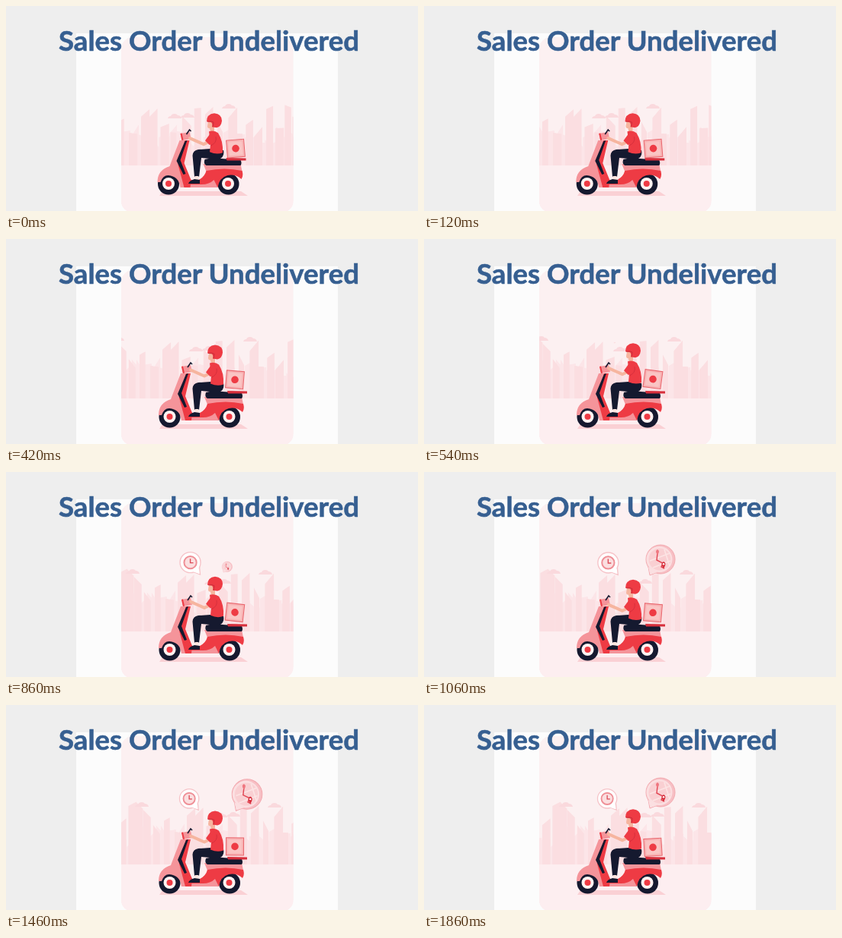
Animation of 540 by 270 pixels, one loop 2.06 s. Source, as an HTML page:

```html
<!DOCTYPE html>
<html lang="en">
<head>
<meta charset="utf-8">
<title>Sales Order Undelivered</title>
<style>
  html, body { margin: 0; width: 100%; height: 100%; overflow: hidden; background: #eee; }
  svg { display: block; width: 540px; height: 270px; }
  .title {
    font: 700 36.6px Lato, Carlito, sans-serif; text-anchor: middle;
    fill: #365f91; stroke: #365f91; stroke-width: .6px;
  }
  .navy { fill: #15192f; }
  .red { fill: #ee3b44; }
  .deep { fill: #d72f3c; }
  .rose { fill: #f5949a; }
  .skin { fill: #f6b59f; }
</style>
</head>
<body>
<svg viewBox="0 0 540 270">
  <defs>
    <clipPath id="card"><rect x="151" y="41" width="225.5" height="231" rx="15"/></clipPath>
    <path id="cloud" d="M-9 3Q-8 0-5 0Q-4-3 0-3Q3-3 4-1Q8-1 9 3Z" fill="#fad9dd"/>
    <g id="hub">
      <circle r="8" fill="#fff3f2"/>
      <circle r="4" class="red"/>
    </g>
  </defs>

  <rect x="92" y="36" width="343" height="234" fill="#fcfcfc"/>
  <g clip-path="url(#card)">
    <rect x="151" y="36" width="226" height="234" fill="#fcf0f1"/>
    <g id="city"></g>
    <rect x="151" y="210" width="226" height="60" fill="#fdeef0"/>
  </g>

  <path d="M205 244H308L317 250H201Z" fill="#fad0d4"/>

  <g id="scooter">
    <circle class="navy" cx="214.5" cy="234.5" r="14"/>
    <circle class="navy" cx="293" cy="234.5" r="14"/>
    <!-- rear body: rose band under the seat, red flank, rose sill -->
    <path class="rose" d="M260 208H309L311 218H264Z"/>
    <path class="red" d="M264 217Q288 212 311 217Q313 224 310 228Q302 221 292 223Q281 226 279 239H231L228 226L238 222L244 229H254Q262 225 264 217Z"/>
    <path class="rose" d="M233 235H258Q268 235 274 229L279 239H234Z"/>
    <!-- front fender and leg shield -->
    <path class="rose" d="M200 232Q200 216 216 211L229 177H239L231 209L236 239H230Q228 224 214 223Q207 223 204 232Z"/>
    <path class="red" d="M236 177H242L235 207L244 229L243 239H235L227 209Z"/>
    <path class="navy" d="M236 178L239 177L230 203L237 221L234 222L225 204Z"/>
    <path class="rose" d="M230 168L242 166L244 175L232 177Z"/>
    <path class="red" d="M230 168L232 167.5L234 176.5L232 177Z"/>
    <path d="M238 169L242 163L244 165" fill="none" stroke="#15192f" stroke-width="1.6"/>
    <use href="#hub" x="214.5" y="234"/>
    <use href="#hub" x="292.5" y="234"/>
    <!-- seat and rack -->
    <path class="navy" d="M262 202Q272 199 284 201L309 203Q311 207 309 210H264Q260 208 262 202Z"/>
    <path class="deep" d="M290 200L316 200.5V203.5H291Z"/>
  </g>

  <g id="parcel">
    <rect x="-11.5" y="-11.5" width="23" height="23" fill="#f8b3b4" stroke="#e9656c"/>
    <rect x="-9" y="-9" width="18" height="18" fill="#fac5c4"/>
    <circle r="4.8" class="red"/>
  </g>

  <!-- leg, ankle and shoe -->
  <path class="navy" d="M268 188L285 190Q287 200 278 202L256 200L253 225H247L244.5 197Q245 190 252 189Z"/>
  <path d="M247.5 224H252.5V230H248Z" fill="#fde3dd"/>
  <path class="navy" d="M247 228L254 229V234H239Q240 230 247 228Z"/>

  <g id="rider">
    <path class="skin" d="M266 149H274V163H269L268 158Q265 158 265 155Z"/>
    <path class="red" d="M267 162Q274 160 279 164Q286 175 285 190Q277 193 268 189L269 179Z"/>
    <path d="M270 174L260 179L242 171" fill="none" stroke="#f6b59f" stroke-width="4" stroke-linecap="round" stroke-linejoin="round"/>
    <path class="red" d="M270 163Q276 166 274 174L268 180L262 174Z"/>
    <path d="M276 169Q278 177 269 181" fill="none" stroke="#d72f3c"/>
    <path class="red" d="M264 149Q264 139 274 138Q284 139 284 148Q283 156 277 157L271 156Q272 152 270 150Z"/>
    <path d="M265 149Q271 148 273 150L272 156" fill="none" stroke="#c92c3a"/>
  </g>

  <g id="clock">
    <path d="M3 12L13 16L12 5Z" fill="#fff" stroke="#f6c3c8" stroke-width="1.4"/>
    <circle r="13.6" fill="#fff" stroke="#f6c3c8" stroke-width="1.4"/>
    <path d="M3 12L12 15L11 5Z" fill="#fff"/>
    <circle r="8.2" fill="#fbdfe0" stroke="#ef8f96" stroke-width="2"/>
    <path d="M0-5V.5H4" fill="none" stroke="#dc4b57" stroke-width="1.4"/>
  </g>

  <g id="map">
    <path d="M-16 10L-14 21L-4 17Z" fill="#fbdfe1" stroke="#f3a9af"/>
    <circle r="19" fill="#f7bfc4" stroke="#f3a9af"/>
    <circle cx="-1.5" r="17" fill="#fbdfe1"/>
    <path d="M-16 10L-13.5 20L-4 17Z" fill="#fbdfe1"/>
    <circle cx="-1" r="14.5" fill="#f9cfd2"/>
    <path d="M-14 2L12-8M-10 11L13 2M5-13L12 9" fill="none" stroke="#fce4e4" stroke-width="1.6"/>
    <path d="M-4-8L-5 1L3 5L1 10L5 12" fill="none" stroke="#e14552" stroke-width="1.4"/>
    <path d="M-4-6Q-8-11-4-13Q0-11-4-6Z" fill="#ef7780"/>
    <path d="M4 12Q-1 5 4 3Q9 5 4 12Z" class="deep"/>
    <circle cx="4" cy="6.2" r="1.2" fill="#fff"/>
  </g>

  <text class="title" x="266" y="58.6">Sales Order Undelivered</text>
</svg>
<script>
  const $ = id => document.getElementById(id);

  let seed = 11;
  const random = () => (seed = seed * 16807 % 2147483647) / 2147483647;

  // A row of slant-roofed buildings; steep > 1 makes tall ones rarer.
  function buildings(gap, top, range, steep, color) {
    let row = '';
    for (let x = 70; x < 382; x += gap * (.7 + random() * .6)) {
      const w = 7 + random() * 5;
      const roof = top + range * (1 - random() ** steep);
      const slant = (random() - .5) * 14;
      row += `M${x} 210V${roof - slant}L${x + w / 2} ${roof}L${x + w} ${roof + slant}V210Z`;
    }
    return `<path d="${row}" fill="${color}"/>`;
  }

  function buildCity() {
    const clouds = [[118, 131], [221, 145], [238, 144], [292, 132]];
    $('city').innerHTML =
      buildings(7, 160, 25, 1, '#fce5e8') +
      buildings(13, 130, 38, 1.3, '#fbdee1') +
      clouds.map(([x, y]) => `<use href="#cloud" x="${x}" y="${y}"/>`).join('');
  }

  const move = (id, x, y, more = '') => $(id).setAttribute('transform', `translate(${x} ${y}) ${more}`);

  // Smooth 0 to 1 ramp.
  function ramp(k, start, span) {
    const p = Math.min(1, Math.max(0, (k - start) / span));
    return p * p * (3 - 2 * p);
  }

  function draw(k) {
    const lean = Math.max(0, 1 - k / 4);
    const tilt = 1.5 - 6.5 * Math.cos((k - 1) * Math.PI / 9);
    move('city', k * 4, 0);
    move('scooter', -lean * 1.5, 0);
    move('rider', -lean, 1.5 + 2.3 * Math.cos((k - 5) * Math.PI * .75));
    move('parcel', 300 + lean, 186.5 - tilt * .25, `rotate(${tilt})`);

    // Bubbles grow away from a fixed point, then drift.
    const settle = ramp(k, 12.5, 2.5);
    const clock = ramp(k, 8.4, 3.8) - settle * .07;
    move('clock', 250.5 - 9 * clock - settle * 2, 138 - 19 * clock + settle * 3, `scale(${clock})`);

    const map = ramp(k, 11.4, 1.5);
    const sway = Math.sin(Math.max(0, k - 13) * Math.PI / 4);
    move('map', 279 + 31 * map + sway * 6, 130 - 15 * map + sway * 2.5, `scale(${map * (1 + sway * .04)})`);
  }

  // Quick 60 ms steps, then 200 ms holds.
  const stepAt = t => t < 660 ? Math.floor(t / 60) : 11 + Math.floor((t - 660) / 200);

  buildCity();
  draw(0);
  const start = performance.now();
  function tick() {
    draw(stepAt((performance.now() - start) % 2060));
    requestAnimationFrame(tick);
  }
  requestAnimationFrame(tick);
</script>
</body>
</html>
```
